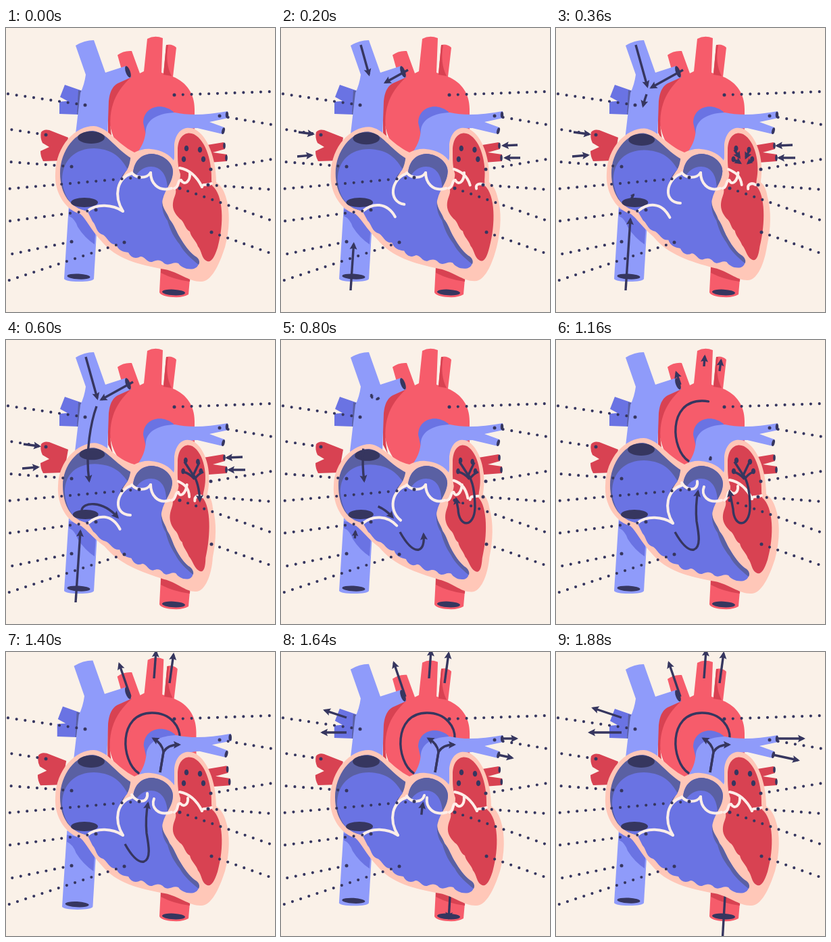
These frames come from a looping animation (398x420 px, 1.92 s). An HTML page:

```html
<!DOCTYPE html>
<html lang="en">
<head>
<meta charset="utf-8">
<title>Blood flow through the heart</title>
<style>
html, body { margin: 0; height: 100%; overflow: hidden; background: #faf1e8; }
svg { display: block; width: 398px; height: 420px; }
.light { fill: #8f9bfa; }
.blue { fill: #6a73e3; }
.shade { fill: #5a60a3; }
.navy { fill: #36365f; }
.red { fill: #f65c6b; }
.dark { fill: #d84252; }
.peach { fill: #ffc7b8; }
.wall { fill: none; stroke: #ffc7b8; stroke-width: 7; stroke-linecap: round; }
.valve { fill: none; stroke: #fdeee9; stroke-width: 4; stroke-linecap: round; stroke-linejoin: round; }
.flow path:first-child { fill: none; stroke: #36365f; stroke-width: 3.4; }
.dots line { stroke: #36365f; stroke-width: 4.2; stroke-linecap: round; stroke-dasharray: 0 12.8; }
</style>
</head>
<body>
<svg viewBox="0 0 398 420">
  <g class="pulse">
    <path class="blue" d="M87 84L113 93 108 128 79 127 79 109 91 108 80 102Z"/>
    <path class="shade" d="M107 92L114 94 109 128 105 128Z"/>
    <path class="dark" d="M52 154Q56 149 64 151L92 162 86 196 55 197Q51 190 51 182L64 176 54 170Q50 162 52 154Z"/>
    <path class="dark" d="M292 174L322 169 324 179 306 184 327 187 327 197 300 199Z"/>
    <ellipse class="navy" cx="323" cy="174" rx="1.8" ry="4.5"/>
    <ellipse class="navy" cx="326" cy="192" rx="1.8" ry="4.5"/>
    <path class="light" d="M93 262L136 270 130 371Q128 375 108 375 89 375 86 371Z"/>
    <path class="blue" d="M93 268L134 275 131 320Q116 310 106 294 102 282 93 278Z"/>
    <ellipse class="navy" cx="107.500" cy="367.500" rx="17" ry="4" transform="rotate(3 107 367)"/>
  </g>
  <path class="red" d="M229 352L273 360 270 394Q262 399 247 398 230 397 227 391Z"/>
  <path class="dark" d="M229 352L273 360 272 375Q248 372 229 362Z"/>
  <ellipse class="navy" cx="248" cy="391" rx="17" ry="4.300" transform="rotate(3 248 391)"/>
  <g class="flow" id="back"></g>
  <g class="pulse">
    <path class="red" d="M165 40Q174 33 186 34L198 67 204 64 209 16Q220 10 232 15L230 66 233 67 237 25Q246 23 252 29L247 72C267 80 279 97 279 120L279 160 250 190 180 190C160 172 151 150 151 110Q153 88 174 72Z"/>
    <path class="dark" d="M174 72C158 82 151 92 151 116L151 155 158 168C148 125 159 96 186 72Z"/>
    <path class="dark" d="M237 25L240 25Q235 52 245 71L233 69Z"/>
  </g>
  <g class="flow" id="mid"></g>
  <g class="pulse">
    <path class="light" d="M103 26Q116 18 130 18L147 66 178 56 185 73 165 82Q154 88 152 108L150 165 102 165 110 96Q116 84 118 69Z"/>
    <ellipse class="navy" cx="180.500" cy="65" rx="3.300" ry="9" transform="rotate(-20 180 65)"/>
    <path class="blue" d="M203 140C203 118 228 108 248 124L244 150 207 158Z"/>
    <path class="light" d="M190 190C203 174 206 163 207 150 210 134 226 126 250 125Q280 132 328 123L329 133 301 139 323 147 321 157 283 148Q262 148 254 162L248 198Z"/>
    <ellipse class="navy" cx="327" cy="128.500" rx="2.200" ry="4.800"/>
    <ellipse class="navy" cx="321.500" cy="152" rx="2.200" ry="5" transform="rotate(15 321 152)"/>
  </g>
  <g id="heart"></g>
  <g class="flow" id="front"></g>
  <g class="dots" id="dots"></g>
</svg>
<script>
const LOOP = 1920;
const $ = id => document.getElementById(id);
const clamp = x => Math.max(0, Math.min(1, x));
const ease = x => { x = clamp(x); return x * x * (3 - 2 * x); };

function add(parent, tag, attrs) {
  const el = document.createElementNS('http://www.w3.org/2000/svg', tag);
  for (const k in attrs) el.setAttribute(k, attrs[k]);
  return parent.appendChild(el);
}

// Eased value through time/value pairs
function track(t, keys) {
  let [t0, v0] = keys[0];
  for (const [t1, v1] of keys) {
    if (t < t1) return v0 + (v1 - v0) * ease((t - t0) / (t1 - t0));
    [t0, v0] = [t1, v1];
  }
  return v0;
}

function oval(x, y, rx, ry) {
  const a = rx * .55, b = ry * .55, l = x - rx, r = x + rx, u = y - ry, d = y + ry;
  return `M${l} ${y}C${l} ${y - b} ${x - a} ${u} ${x} ${u}C${x + a} ${u} ${r} ${y - b} ${r} ${y}` +
    `C${r} ${y + b} ${x + a} ${d} ${x} ${d}C${x - a} ${d} ${l} ${y + b} ${l} ${y}Z`;
}

// [class, path, open valve path, valve name]
const heart = [
  ['peach', 'M73 215C74 173 103 145 130 145C152 147 162 170 190 184C198 180 207 178 214 179C230 180 243 188 249 197L249 172C252 150 266 144 280 150C298 160 311 192 311 228C317 232 322 239 325 249C332 270 331 298 324 324C315 352 303 376 288 375C270 375 256 361 235 357C196 350 163 342 141 315C125 298 120 284 110 275C90 270 71 245 73 215Z'],
  ['shade', 'M80 215C80 180 105 151 129 152C150 155 160 177 186 193C184 207 172 216 168 230L172 271L120 270C95 267 80 245 80 215Z'],
  ['blue', 'M83 225C83 195 103 178 130 178C155 179 168 188 180 209C172 217 167 223 168 235L173 272L125 272C100 267 86 255 83 225Z'],
  ['blue', 'M188 214C190 196 200 187 215 186C235 187 247 201 247 212C247 226 235 240 232 253C228 265 238 271 242 283C249 291 252 302 258 311C264 321 271 331 279 337C288 343 287 353 278 356C268 358 259 354 255 348C247 345 241 353 234 348C228 342 223 343 216 346C208 347 206 338 199 338C192 342 185 340 181 332C173 331 166 329 163 320C153 321 151 311 144 306C133 303 134 292 128 286L121 272C130 263 145 262 162 264C160 240 172 222 188 214Z'],
  ['shade', 'M188 214C190 196 200 187 215 186C235 187 247 201 247 212C247 222 243 229 239 236C238 216 228 205 215 205C203 205 195 212 191 221Z'],
  ['shade', 'M232 247C228 265 238 271 242 283C249 291 252 302 258 311C264 321 271 331 279 337C287 341 287 347 285 350C274 341 264 333 257 320C248 309 243 299 239 285C232 275 229 265 232 247Z'],
  ['dark', 'M254 181C254 159 267 152 278 157C297 167 305 201 304 225L305 233C322 247 323 290 313 325C307 343 302 348 296 344C289 340 290 330 284 323C281 314 274 310 272 301C264 297 265 287 257 282C250 275 246 268 247 259C248 249 254 244 250 236C255 231 258 226 258 216C254 205 254 194 254 181Z'],
  ['wall', 'M188 190Q187 202 182 213'],
  ['navy', oval(126, 162, 20, 9)],
  ['navy', oval(116, 258, 20, 7)],
  ...[[267, 178], [287, 180], [263, 194], [292, 194]].map(([x, y]) => ['navy', oval(x, y, 3.2, 4.3)]),
  ['valve', 'M120 271C134 259 158 261 173 271', 'M122 270C135 259 156 256 168 281', 'inlet'],
  ['valve', 'M186 215C164 222 159 248 173 271', 'M184 216C163 224 157 258 184 259', 'inlet'],
  ['valve', 'M257 207C268 209 281 217 290 235', 'M256 209C266 213 276 217 281 232', 'inlet'],
  ['valve', 'M290 235C291 229 297 234 304 230', 'M293 238C290 231 297 228 304 232', 'inlet'],
  ['valve', 'M249 237C257 236 253 224 259 225C264 234 273 227 272 214', 'M249 237C256 234 252 223 258 224C264 231 270 224 269 216', 'outlet'],
  ['valve', 'M186 214C193 223 208 223 214 214', 'M186 211C193 224 211 224 209 209', 'outlet'],
  ['valve', 'M214 214C214 228 224 243 245 237', 'M219 217C214 229 224 243 245 237', 'outlet']
].map(([cls, d, open, valve]) => ({ d, open, valve, el: add($('heart'), 'path', { class: cls }) }));

const NUM = /-?\d+(\.\d+)?/g;
function mix(a, b, k) {
  const to = b.match(NUM);
  let i = 0;
  return a.replace(NUM, n => +n + (to[i++] - n) * k);
}

// Squeeze the ventricles (v) and atria (a)
function warp(d, v, a) {
  return d.replace(/(-?[\d.]+) (-?[\d.]+)/g, (_, x, y) => {
    x = +x; y = +y;
    const low = ease((y - 190) / 70), base = ease((y - 270) / 50);
    let dx = -20 * v * ease((x - 215) / 105) * low * (1 - .5 * ease((y - 310) / 50));
    let dy = -3 * v * base;
    if (x < 235) {
      const side = base * clamp((235 - x) / 60);
      dx += 5 * v * side;
      dy -= 7 * v * side;
    }
    if (x < 190) {
      dx += 5 * a * clamp((150 - x) / 70) * clamp((285 - y) / 30);
      dy += 9 * a * clamp((210 - y) / 45);
    } else if (x > 250) {
      dx -= 6 * a * clamp((x - 255) / 50) * (1 - low);
    }
    return `${(x + dx).toFixed(2)} ${(y + dy).toFixed(2)}`;
  });
}

// [layer, path, head start, head end, tail start, tail end, arrowhead: 0 none, 1 always, 2 while moving]
const flows = [
  ['front', 'M118 25L135 86', 20, 300, 640, 840, 1],
  ['front', 'M188 62L141 88', 20, 300, 640, 840, 1],
  ['front', 'M103 388L110 283', 20, 320, 640, 840, 1],
  ['front', 'M26 154L49 157', 20, 240, 640, 800, 1],
  ['front', 'M24 190L47 188', 20, 240, 640, 800, 1],
  ['front', 'M350 173L327 174', 20, 240, 640, 800, 1],
  ['front', 'M354 192L330 192', 20, 240, 640, 800, 1],
  ['front', 'M134 98C126 120 117 165 123 208', 280, 600, 680, 900, 1],
  ['front', 'M112 252C113 240 142 236 165 262', 300, 600, 680, 900, 1],
  ['front', 'M264 180L277 200', 220, 480, 1180, 1300, 2],
  ['front', 'M286 181L277 200', 220, 480, 1180, 1300, 2],
  ['front', 'M262 195Q272 197 279 206', 220, 480, 1180, 1300, 2],
  ['front', 'M292 195Q284 198 279 206', 220, 480, 1180, 1300, 2],
  ['front', 'M277 199C285 211 287 228 287 248C286 278 263 278 262 250L257 224', 440, 880, 1200, 1380, 1],
  ['front', 'M176 284C185 300 195 312 204 310C215 306 211 285 208 268Q206 245 210 224', 660, 940, 1440, 1700, 1],
  ['mid', 'M196 179C170 162 165 90 216 90C245 90 258 112 257 128Q256 148 246 162', 860, 1400, 0, 0, 0],
  ['front', 'M184 66L167 16', 960, 1460, 0, 0, 1],
  ['front', 'M219 39L222 -2', 960, 1460, 0, 0, 1],
  ['front', 'M242 46L248 2', 960, 1460, 0, 0, 1],
  ['front', 'M228 178L233 148Q231 135 218 128', 1110, 1380, 0, 0, 1],
  ['front', 'M228 178L233 148Q239 137 256 137', 1110, 1380, 0, 0, 1],
  ['front', 'M97 97L55 83', 1470, 1720, 0, 0, 1],
  ['front', 'M97 119L50 119', 1470, 1720, 0, 0, 1],
  ['front', 'M325 128L366 128', 1500, 1760, 0, 0, 1],
  ['front', 'M321 152L358 160', 1500, 1760, 0, 0, 1],
  ['back', 'M251 345L246 430', 1500, 1760, 0, 0, 1]
].map(([layer, d, in0, in1, out0, out1, head]) => {
  const g = add($(layer), 'g', {});
  const line = add(g, 'path', { d, 'stroke-linecap': head ? 'butt' : 'round' });
  const tip = add(g, 'path', { class: 'navy', d: 'M3 0L-8 -5.500L-6 0L-8 5.500Z' });
  return { g, line, tip, in0, in1, out0, out1, head, len: line.getTotalLength() };
});

const leaders = [
  [117, 114, 0, 97], [59, 158, 6, 150], [97, 205, 5, 198], [197, 221, 2, 238],
  [133, 269, 2, 286], [97, 316, 5, 335], [175, 317, 2, 374], [249, 99, 394, 94],
  [316, 130, 394, 143], [303, 209, 394, 194], [299, 232, 394, 239],
  [257, 237, 394, 285], [304, 302, 394, 334]
];
for (const [x1, y1, x2, y2] of leaders) {
  add($('dots'), 'line', { x1, y1, x2, y2 });
  add($('dots'), 'circle', { class: 'navy', cx: x1, cy: y1, r: 2.5 });
}

function drawFlow(f, t) {
  const end = ease((t - f.in0) / (f.in1 - f.in0)) * f.len;
  const start = f.out1 ? ease((t - f.out0) / (f.out1 - f.out0)) * f.len : 0;
  const shown = t >= 40 && end - start > .5;
  f.g.style.display = shown ? '' : 'none';
  if (!shown) return;
  f.line.setAttribute('stroke-dasharray', `${end - start} ${f.len + 9}`);
  f.line.setAttribute('stroke-dashoffset', -start);
  const p = f.line.getPointAtLength(end), q = f.line.getPointAtLength(Math.max(0, end - 2));
  const angle = Math.atan2(p.y - q.y, p.x - q.x) * 180 / Math.PI;
  const size = clamp((end - start) / 12);
  f.tip.setAttribute('transform', `translate(${p.x} ${p.y}) rotate(${angle}) scale(${size})`);
  f.tip.style.display = f.head === 1 || f.head === 2 && t < f.in1 ? '' : 'none';
}

const pulses = document.querySelectorAll('.pulse');
function draw(now) {
  const t = now % LOOP;
  const v = track(t, [[0, 0], [600, 1], [700, 1], [1140, 0]]);
  const a = track(t, [[0, 0], [840, 1], [960, 1], [1150, 0]]);
  const u = track(t, [[1160, 0], [1400, 1], [1680, 0]]);
  const gate = {
    inlet: track(t, [[20, 0], [260, 1], [660, 1], [900, 0]]),
    outlet: track(t, [[840, 0], [1080, 1], [1480, 1], [1760, 0]])
  };
  pulses.forEach((g, i) => {
    const s = 1 + u * (i === 1 ? .025 : .032);
    g.setAttribute('transform', `translate(180 190) scale(${s}) translate(-180 -190)`);
  });
  for (const h of heart) {
    const d = h.open ? mix(h.d, h.open, gate[h.valve]) : h.d;
    h.el.setAttribute('d', warp(d, v, a));
  }
  for (const f of flows) drawFlow(f, t);
}

const begin = performance.now();
function tick() {
  draw(performance.now() - begin);
  requestAnimationFrame(tick);
}
tick();
</script>
</body>
</html>
```
